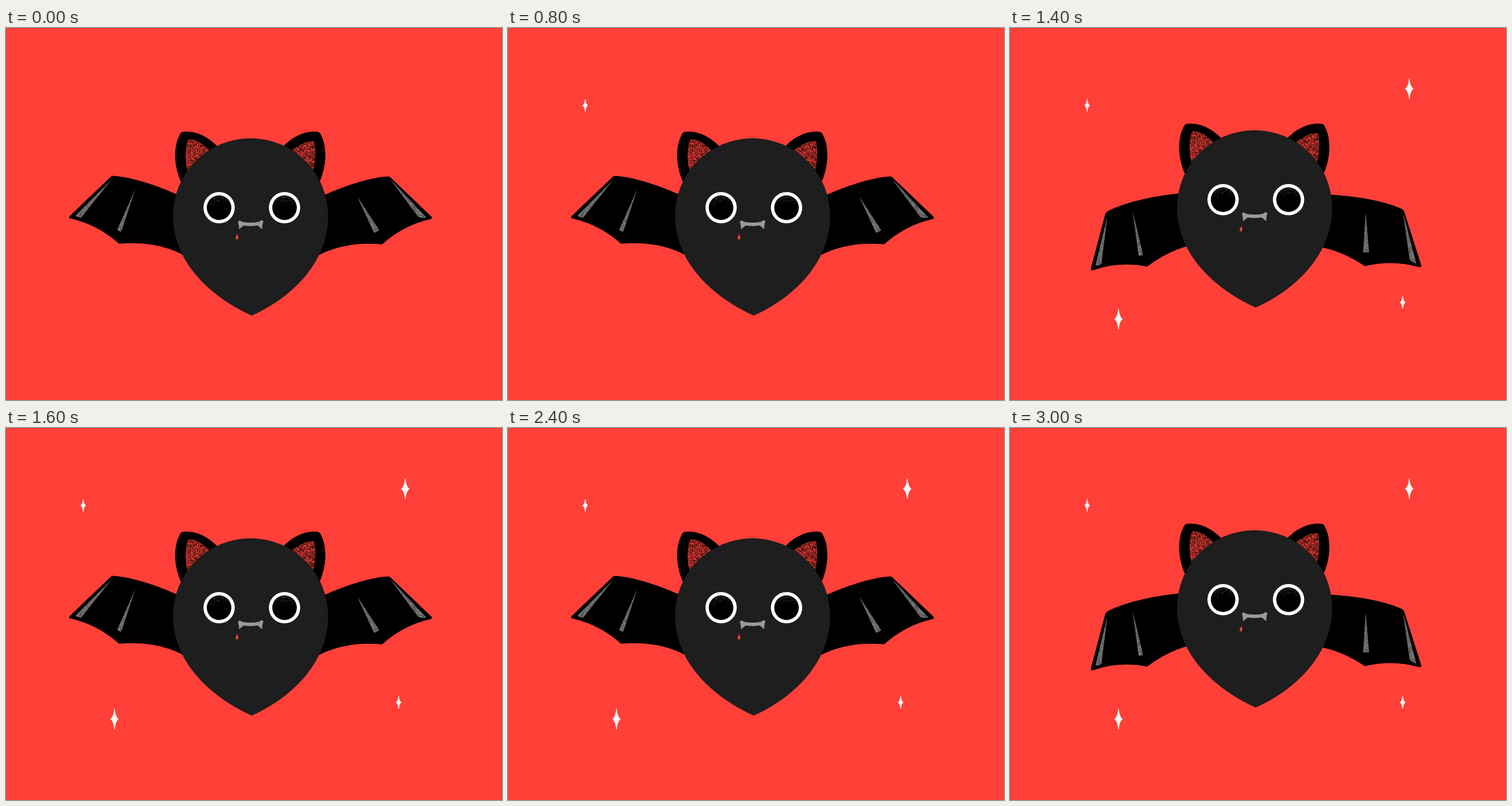
An HTML page that plays this animation: 864x648 px, repeating every 3200 ms.

```html
<!DOCTYPE html>
<html lang="en">
<head>
<meta charset="utf-8">
<title>Flapping bat</title>
<style>
  html, body { margin: 0; width: 100%; height: 100%; overflow: hidden; background: #ff4038; }
  svg { display: block; width: 864px; height: 648px; }
</style>
</head>
<body>
<svg viewBox="0 0 864 648" xmlns="http://www.w3.org/2000/svg">
  <defs>
    <path id="wing" d="M340 312 C290 284 230 262 190 258.500 Q184 257.500 180 262.500 L111.500 328 Q109.500 331 114 331.500 Q160 342 197 375 Q260 369 310 395 Z"
      stroke="#000" stroke-width="1.500" stroke-linejoin="round"/>
    <path id="ear" d="M308 275 C291 242 291 206 303.500 184 Q305 180.500 312 180.500 C335 180 354 191 370 208 Z"/>
    <path id="torso" d="M428 501 C370 475 291 417 291 327 A135 135 0 0 1 561 327 C561 417 486 475 428 501 Z"/>
  </defs>
  <rect width="864" height="648" fill="#ff4038"/>
  <g id="stars" fill="#fff6f5"></g>
  <g id="leftWing"><use href="#wing"/></g>
  <g transform="translate(852 0) scale(-1 1)"><g id="rightWing"><use href="#wing" y="1"/></g></g>
  <g id="bat">
    <use href="#ear"/>
    <use href="#ear" transform="translate(851 0) scale(-1 1)"/>
    <g id="innerEars"></g>
    <use href="#torso" fill="#1e1e1e"/>
    <g id="grain" opacity=".3"></g>
    <g id="eyes"></g>
    <path fill="#999" d="M404 338 Q406 333.500 411 337.500 Q426 340.500 441 337.500 Q446 333 448.500 337 Q446 342 446.500 350.500 Q443 348 438.500 344 Q426 346 414 344 Q409 348 406 350.500 Q406 344 404 338 Z"/>
    <path fill="#ff4038" d="M403.500 359.500 C401.500 361.500 399.500 364 400 366.500 Q401 369 403.500 368 Q405.500 367 403.500 359.500 Z"/>
  </g>
</svg>
<script>
const byId = id => document.getElementById(id);

let seed = 7;
const random = () => (seed = seed * 16807 % 2147483647) / 2147483647;

function add(parent, tag, attrs) {
  const node = document.createElementNS("http://www.w3.org/2000/svg", tag);
  for (const key in attrs) node.setAttribute(key, attrs[key]);
  parent.append(node);
  return node;
}

// One path made of many small square dots.
function speckle(parent, count, size, fill, place, clip) {
  let d = "";
  for (let i = 0; i < count; i++) {
    const [x, y] = place();
    d += `M${x.toFixed(1)} ${y.toFixed(1)}h${size}v${size}h-${size}z`;
  }
  const attrs = { d, fill };
  if (clip) attrs["clip-path"] = `url(#${clip})`;
  add(parent, "path", attrs);
}

const inBox = (x, y, w, h) => () => [x + random() * w, y + random() * h];

let clipCount = 0;
function texturedShape(parent, d, fill, count, size, dotFill, box) {
  const id = "clip" + clipCount++;
  add(add(parent, "clipPath", { id }), "path", { d });
  add(parent, "path", { d, fill });
  speckle(parent, count, size, dotFill, inBox(...box), id);
}

const streak = (wing, d, box) =>
  texturedShape(byId(wing), d, "#7a7a7a", box[2] * box[3] * .3, 1, "#363636", box);
streak("leftWing", "M183 265 L121 327 Q126 331 131 330 Z", [120, 264, 64, 68]);
streak("leftWing", "M225 281 L194 351 Q197 355 201 354.500 Z", [193, 280, 33, 76]);
streak("rightWing", "M183 263 L120 330 Q127 332 134 329 Z", [119, 262, 65, 70]);
streak("rightWing", "M240 294 L202 352 Q207 356 211 356.500 Z", [201, 293, 40, 65]);

const innerEar = (d, box) =>
  texturedShape(byId("innerEars"), d, "#dc3a33", 1250, 1, "#1a0605", box);
innerEar("M317 252 C311 230 312 204 318 194 C332 193 345 203 356 216 Z", [311, 193, 46, 57]);
innerEar("M533 252 C540 230 540 208 536 197 C520 197 507 206 495 216 Z", [495, 196, 46, 55]);

add(add(byId("grain"), "clipPath", { id: "torsoClip" }), "use", { href: "#torso" });
speckle(byId("grain"), 3000, 1, "#000", inBox(291, 192, 270, 309), "torsoClip");
speckle(byId("grain"), 3000, 1, "#3a3a3a", inBox(291, 192, 270, 309), "torsoClip");

for (const cx of [371.2, 485.2]) {
  add(byId("eyes"), "circle", { cx, cy: 313, r: 27.3, fill: "#fff" });
  add(byId("eyes"), "circle", { cx, cy: 313, r: 21.4, fill: "#000" });
  speckle(byId("eyes"), 110, .8, "#4a4a4a", () => {
    const angle = -Math.PI / 2 + (random() + random() - 1) * 1.5;
    const radius = 20 - 9 * random() ** 2;
    return [cx + radius * Math.cos(angle), 313 + radius * Math.sin(angle)];
  });
}

function star(x, y, w, h, start) {
  const d = `M0 ${-h}Q${w * .2} ${-h * .2} ${w} 0Q${w * .2} ${h * .2} 0 ${h}` +
    `Q${-w * .2} ${h * .2} ${-w} 0Q${-w * .2} ${-h * .2} 0 ${-h}Z`;
  const node = add(byId("stars"), "path", {
    d, transform: `translate(${x} ${y})`, stroke: "#fff6f5", "stroke-width": .8, "stroke-linejoin": "round"
  });
  return { node, start };
}
const stars = [
  star(134.5, 135, 4.5, 11, 4),
  star(684, 478, 4.5, 11, 5),
  star(695.5, 106, 7, 18, 6),
  star(189, 507, 7, 18, 7)
];

// Each wing pose: angle, dx, dy.
const poses = [
  { lift: 0, left: [0, 0, 0], right: [0, 0, 0] },
  { lift: -14, left: [10, -.5, 0], right: [11, 0, 1] },
  { lift: 0, left: [22.3, 0, -.6], right: [21.2, -.7, 2] },
  { lift: -14, left: [31.4, 10, 2], right: [28.6, 8, 3] }
];

const wingTransform = ([angle, dx, dy]) => `translate(${dx} ${dy}) rotate(${-angle} 280 337)`;

function draw(time) {
  const step = Math.floor(time % 3200 / 200);
  const pose = poses[step % 4];
  byId("bat").setAttribute("transform", `translate(0 ${pose.lift})`);
  byId("leftWing").setAttribute("transform", wingTransform(pose.left));
  byId("rightWing").setAttribute("transform", wingTransform(pose.right));
  for (const { node, start } of stars)
    node.setAttribute("visibility", step >= start ? "visible" : "hidden");
}

const begin = performance.now();
function tick() {
  draw(performance.now() - begin);
  requestAnimationFrame(tick);
}
tick();
</script>
</body>
</html>
```
